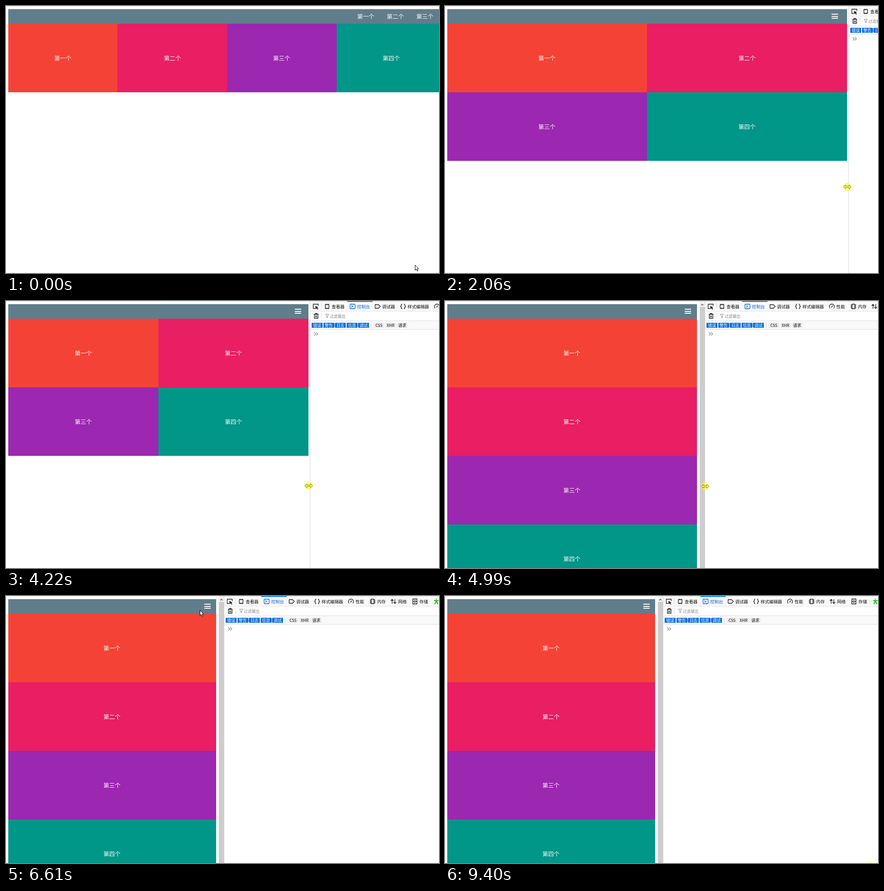
Write an HTML page that moves like this. It is 952 px wide and 588 px high and loops after 9490 ms.

```html
<!DOCTYPE html>
<html lang="zh-CN">
<head>
<meta charset="utf-8">
<title>响应式布局</title>
<style>
  html, body { margin: 0; height: 100%; overflow: hidden; background: #fff; }
  svg { display: block; width: 952px; height: 588px; }
  text { font: 12.5px "Noto Sans CJK SC", "Noto Sans CJK", sans-serif; fill: #fff; text-anchor: middle; }
  rect { shape-rendering: crispEdges; }
  #panel text { font-size: 9.4px; fill: #0c0c0d; text-anchor: start; }
  #panel .mid { font-size: 8.8px; text-anchor: middle; }
  #panel .on { fill: #fff; }
  #panel .active { fill: #0060df; }
  #panel .hint { font-size: 8.6px; fill: #85858a; }
  #panel path { fill: none; stroke: #18181a; stroke-width: 1.3; }
  .cursor { fill: #fff; stroke: #000; stroke-width: 1; stroke-linejoin: round; }
</style>
</head>
<body>
<svg id="stage" viewBox="0 0 952 588">
  <g id="page"></g>
  <g id="menu"></g>
  <g id="burger" fill="#fff">
    <rect y="17" width="14" height="2"/><rect y="22" width="14" height="2"/><rect y="26" width="14" height="2"/>
  </g>
  <g id="scroll">
    <rect y="1" width="11" height="587" fill="#f0f0f0"/>
    <rect id="thumb" y="13" width="11" height="575"/>
    <path d="M3 9.5L5.5 7L8 9.5" fill="none" stroke="#505050" stroke-width="1.5"/>
  </g>
  <g id="side"></g>
  <rect width="952" height="1" fill="#dfe3e6"/>
  <g id="panel"></g>
  <g id="pointer">
    <circle id="glow" r="9" fill="#ff0" fill-opacity=".55"/>
    <path id="arrow" class="cursor" d="M.5 .5V12L3 9.7L5 13.8L6.8 13L5 9H8.5Z"/>
    <path id="resize" d="M-8.5 0L-4-4V-1.5H4V-4L8.5 0L4 4V1.5H-4V4Z" fill="#ffff8c" stroke="#77770a"/>
    <path id="hand" class="cursor" d="M-1 10V1.5Q0-.5 1.5 1.5V6.5Q3 5.5 4 7Q5.500 6.500 6 8Q8 7.500 8 9.500V13L6.500 17H-.5L-4 11.500Q-4.500 9-2.500 9.500Z"/>
  </g>
</svg>
<script>
const LOOP = 9490, SLATE = '#607d8b';
const NAMES = ['第一个', '第二个', '第三个', '第四个'];
const COLORS = ['#f44336', '#e91e63', '#9c27b0', '#009688'];

const $ = id => document.getElementById(id);
const set = (node, attrs) => {
  for (const key in attrs) node.setAttribute(key, attrs[key]);
  return node;
};
const add = (parent, tag, attrs, label) => {
  const node = set(document.createElementNS('http://www.w3.org/2000/svg', tag), attrs);
  if (label) node.textContent = label;
  return parent.appendChild(node);
};
const box = (parent, x, y, width, height, fill) => add(parent, 'rect', { x, y, width, height, fill });
const move = (node, x, y = 0) => set(node, { transform: `translate(${x} ${y})` });
const show = (node, on) => set(node, { display: on ? 'inline' : 'none' });

// Page
const nav = box($('page'), 4.6, 7, 0, 32, SLATE);
const blocks = NAMES.map((name, i) => ({
  rect: box($('page'), 0, 0, 0, 151, COLORS[i]),
  label: add($('page'), 'text', {}, name)
}));
const links = NAMES.slice(0, 3).map(name => add($('menu'), 'text', { y: 27.5 }, name));

// Side menu
box($('side'), -1, 1, 120, 587, SLATE);
NAMES.slice(0, 3).forEach((name, i) => {
  add($('side'), 'text', { x: 57, y: 26 + 41 * i }, name);
  box($('side'), 0, 41 + 41 * i, 116, 1, '#8496a0');
});

// Developer tools
const panel = $('panel');
const icon = (x, y, d, style = '') => move(add(panel, 'path', { d, style }), x, y);
box(panel, 0, 1, 960, 587, '#fff');
box(panel, 0, 0, 960, 62, '#f9f9fa');
box(panel, 0, 23, 960, 20, '#fff');
for (const y of [0, 22, 43, 62]) box(panel, 0, y, 960, 1, '#e0e0e2');
box(panel, 0, 0, 1, 588, '#d7d7db');
for (const [x, y] of [[25, 4], [25, 26], [135, 47]]) box(panel, x, y, 1, 14, '#dcdce0');
box(panel, 82, 0, 56, 2, '#0a84ff');

icon(13, 12, 'M-1 4.500H-5.500V-5H5.500V-1');
icon(13, 12, 'M-1-1L6 2L3.300 3L5.500 6L4 7L2 4L0 6Z', 'fill:#18181a;stroke:none');
const TABS = [
  [38, '查看器', 'M-4-4H4V4H-4ZM-2-6V-4M2-6V-4M-2 4V6M2 4V6'],
  [94, '控制台', 'M-4.500-5H4.500Q5.500-5 5.500-4V4Q5.500 5 4.500 5H-4.500Q-5.500 5-5.500 4V-4Q-5.500-5-4.500-5ZM-2.500-2.500L0 0L-2.500 2.500'],
  [149, '调试器', 'M-5.500-3.500Q-5.500-4-5-4H2L6 0L2 4H-5Q-5.500 4-5.500 3.500Z'],
  [205, '样式编辑器', 'M-2-5Q-4-5-4-3V-1.500L-5.500 0L-4 1.500V3Q-4 5-2 5M2-5Q4-5 4-3V-1.500L5.500 0L4 1.500V3Q4 5 2 5'],
  [279.5, '性能', 'M-4 4A5.500 5.500 0 1 1 4 4M-1 2L2-2'],
  [327, '内存', 'M-3-5H3V5H-3ZM-6-3H-3M-6 0H-3M-6 3H-3M3-3H6M3 0H6M3 3H6'],
  [373, '网络', 'M-3 5V-4M-6-1.500L-3-4.500L0-1.500M3-5V4M0 1.500L3 4.500L6 1.500'],
  [420, '存储', 'M-4.500-5.500H4.500V5.500H-4.500ZM-4.500 0H4.500M-1.500-2.700H1.500M-1.500 2.700H1.500']
];
TABS.forEach(([x, name, d], i) => {
  icon(x, 12, d, i === 1 ? 'stroke:#0060df' : '');
  add(panel, 'text', { x: x + 10, y: 15.5, class: i === 1 ? 'active' : '' }, name);
});
icon(467, 12, 'M-5-2H5M0-2V2M-3 6L-1.500 1H1.500L3 6M0-6V-4', 'stroke:#12bc00;stroke-width:2');

icon(14, 33, 'M-5-3.500H5M-2-3.500V-5.500H2V-3.500M-4-3.500V5H4V-3.500M-1.300-1V3M1.300-1V3');
icon(38, 33, 'M-3.500-4H3.500L1 0V4L-1 3V0Z', 'stroke:#85858a;stroke-width:1');
add(panel, 'text', { x: 44, y: 36.5, class: 'hint' }, '过滤输出');

['错误', '警告', '日志', '信息', '调试'].forEach((name, i) => {
  const x = 4 + 25.6 * i;
  set(box(panel, x, 48, 24, 11, '#0a6fe0'), { rx: 1.5 });
  add(panel, 'text', { x: x + 12, y: 57, class: 'mid on' }, name);
});
['CSS', 'XHR', '请求'].forEach((name, i) => {
  const x = 140 + 25.6 * i;
  set(box(panel, x, 48, 24, 11, '#ededf0'), { rx: 1.5 });
  add(panel, 'text', { x: x + 12, y: 57, class: 'mid' }, name);
});
icon(13.5, 72.5, 'M-4-3.500L-.5 0L-4 3.500M.5-3.500L4 0L.5 3.500', 'stroke:#85858a');

// Motion: bursts of evenly spaced steps as [start, end, steps]
const BURSTS = [
  [0, 0, 1], [70, 120, 2], [980, 1900, 13], [2060, 2980, 13], [3070, 3990, 13], [4060, 4990, 13],
  [5060, 6000, 13], [6070, 6690, 9], [6840, 7070, 4], [7780, 8700, 13], [8770, 8940, 3], [9400, 9400, 1]
];
const EDGE = [
  [900, 971], [980, 968], [1440, 944], [1900, 896], [2060, 887], [2900, 816], [2980, 806],
  [3990, 695], [4220, 667], [4990, 571], [5680, 503], [6000, 479]
];
const DRAG_Y = [[980, 394], [1440, 396], [2900, 401], [4220, 407], [5680, 409]];
const PATH_X = [
  [0, 899], [70, 940], [120, 980], [6070, 474], [6300, 450], [6540, 411], [6690, 442],
  [8010, 442], [8700, 850], [8770, 890], [8855, 922], [8940, 930], [9400, 933]
];
const PATH_Y = [
  [0, 570], [70, 504], [120, 450], [6070, 400], [6300, 230], [6540, 45], [6690, 16],
  [8010, 16], [8700, 488], [8770, 525], [8855, 557], [8940, 595]
];
const SIDE = [[6840, 0], [7070, 119], [7780, 119], [8010, 0]];

function snap(t) {
  const [start, end, steps] = BURSTS.findLast(b => b[0] <= t);
  const gap = (end - start) / (steps - 1) || 1;
  return start + gap * Math.min(steps - 1, Math.floor((t - start) / gap + .15));
}

function at(keys, t) {
  const i = keys.findIndex(k => k[0] > t);
  if (i === 0) return keys[0][1];
  if (i < 0) return keys[keys.length - 1][1];
  const [t0, a] = keys[i - 1], [t1, b] = keys[i];
  return a + (b - a) * (t - t0) / (t1 - t0);
}

function layout(edge, cols) {
  const left = 4.6, right = edge - (cols === 1 ? 17.4 : 3.4);
  const width = right - left, cell = width / cols;
  set(nav, { width });
  blocks.forEach(({ rect, label }, i) => {
    const x = left + cell * (i % cols), y = 39 + 151 * Math.floor(i / cols);
    set(rect, { x, y, width: cell });
    set(label, { x: Math.round(x + cell / 2), y: y + 80.5 });
  });
  links.forEach((link, i) => set(link, { x: right - 46.7 - (2 - i) * (37.5 + .0285 * width) }));
  move($('burger'), Math.round(right - 16 - .02 * width));
  show($('menu'), cols === 4);
  show($('burger'), cols < 4);
  show($('scroll'), cols === 1);
  move($('scroll'), edge - 11);
  move(panel, edge);
}

function draw(time) {
  const t = snap(time % LOOP);
  const edge = Math.round(at(EDGE, t));
  const cols = edge > 904 ? 4 : edge > 579 ? 2 : 1;
  layout(edge, cols);

  const side = at(SIDE, t);
  show($('side'), side > 0);
  move($('side'), side - 119);

  const drag = t >= 980 && t < 6070;
  const hand = t > 6650 && t < 8050;
  const x = drag ? edge + (cols === 2 ? -2.5 : .5) : at(PATH_X, t);
  const y = drag ? at(DRAG_Y, t) : at(PATH_Y, t);
  move($('pointer'), x, y);
  show($('resize'), drag);
  show($('hand'), hand);
  show($('arrow'), !drag && !hand);
  show($('glow'), drag || t >= 6840 && t < 6990 || t >= 7780 && t < 7900 || t >= 9400);
  const hover = !drag && x > edge - 11 && x < edge;
  set($('thumb'), { fill: hover ? '#a6a6a6' : '#cdcdcd' });
}

const begin = performance.now();
(function tick() {
  draw(performance.now() - begin);
  requestAnimationFrame(tick);
})();
</script>
</body>
</html>
```
